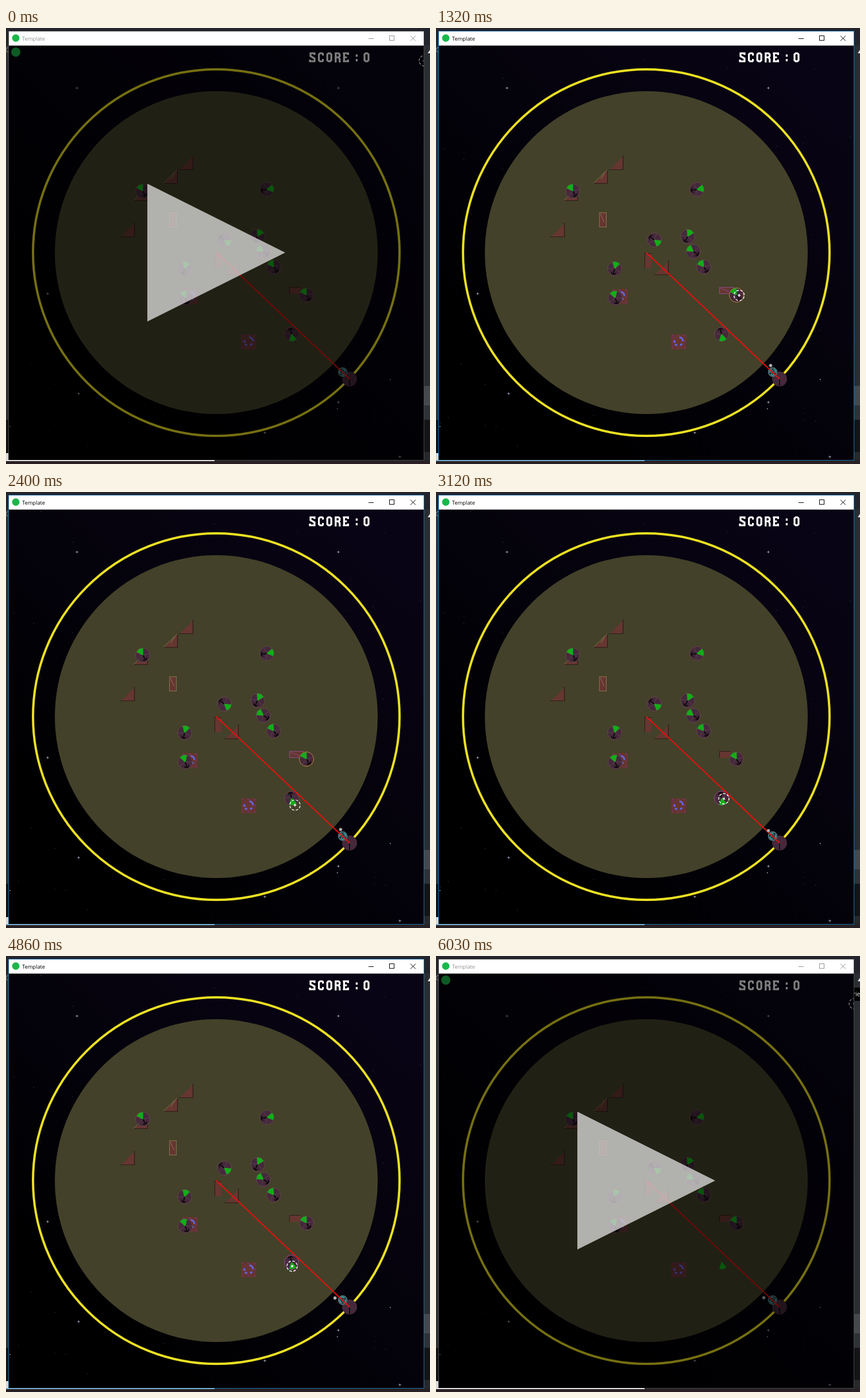
An HTML page with a canvas for the animation above (6.06 s loop, 738 px wide and 759 px high).

```html
<!DOCTYPE html>
<html lang="en">
<head>
<meta charset="utf-8">
<title>Template</title>
<style>
html, body { margin: 0; width: 738px; height: 759px; overflow: hidden; background: #24252c; }
canvas { display: block; }
</style>
</head>
<body>
<canvas id="stage" width="738" height="759" aria-label="Template, SCORE : 0"></canvas>
<script>
const ctx = document.getElementById('stage').getContext('2d');
const LOOP = 6060, RESUME = 120, PAUSE = 5850, SWITCH = 2640, BREAK = 5190, TIP = 5700;
const TAU = Math.PI * 2, RAD = Math.PI / 180;
const CX = 366, CY = 391;

// x, y, direction of the green wedge in degrees
const wheels = [
  [238, 284, -120], [454, 281, -10], [380, 369, 38], [438, 363, -63], [448, 389, -145],
  [466, 416, -125], [311, 419, -75], [312, 470, -108], [523, 465, -122], [497, 533, 77]
];
// right-angle corner of each ramp
const ramps = [[326, 247], [299, 271], [247, 301], [224, 364], [405, 430]];
const brightStars = [[123, 104], [578, 104], [72, 462], [126, 636], [578, 651], [450, 704], [685, 746]];

// time, x, y
const aimPath = [
  [120, 728, 57], [600, 526, 466], [1950, 529, 465], [2400, 503, 545], [3120, 501, 534],
  [4170, 498, 540], [5200, 498, 540], [5460, 711, 170], [5650, 728, 83]
];

const letters = {
  S: 'M10 5V2H3V7L10 11V16H2V13',
  C: 'M10 6V3L9 2H5L3 4V14L5 16H9L10 15V12',
  O: 'M5 2H8L10 4V14L8 16H5L3 14V4Z',
  R: 'M3 18V2H8L10 4V7L8 9H4M8 9L10 12V18',
  E: 'M10 5V2H1M3 2V16M1 16H10V13M3 9H8',
  ':': 'M4 4V8M4 12V16'
};

const smooth = k => {
  k = Math.min(1, Math.max(0, k));
  return k * k * (3 - 2 * k);
};

function along(path, t) {
  let i = 0;
  while (i < path.length - 2 && t > path[i + 1][0]) i++;
  const a = path[i], b = path[i + 1];
  const e = smooth((t - a[0]) / (b[0] - a[0]));
  return [a[1] + (b[1] - a[1]) * e, a[2] + (b[2] - a[2]) * e];
}

function rect(x, y, w, h, color) {
  ctx.fillStyle = color;
  ctx.fillRect(x, y, w, h);
}

function disc(x, y, r, color) {
  ctx.fillStyle = color;
  ctx.beginPath();
  ctx.arc(x, y, r, 0, TAU);
  ctx.fill();
}

function arc(x, y, r, from, to, color, width) {
  ctx.strokeStyle = color;
  ctx.lineWidth = width;
  ctx.beginPath();
  ctx.arc(x, y, r, from, to);
  ctx.stroke();
}

function line(color, width, ...p) {
  ctx.strokeStyle = color;
  ctx.lineWidth = width;
  ctx.beginPath();
  for (let i = 0; i < p.length; i += 2) ctx.lineTo(p[i], p[i + 1]);
  ctx.stroke();
}

function poly(color, ...p) {
  ctx.fillStyle = color;
  ctx.beginPath();
  for (let i = 0; i < p.length; i += 2) ctx.lineTo(p[i], p[i + 1]);
  ctx.fill();
}

function text(s, x, y, size, color) {
  ctx.fillStyle = color;
  ctx.font = size + 'px "Open Sans", sans-serif';
  ctx.fillText(s, x, y);
}

function at(x, y, angle, draw) {
  ctx.save();
  ctx.translate(x, y);
  ctx.rotate(angle);
  draw();
  ctx.restore();
}

function desktop(tip) {
  rect(0, 0, 738, 759, '#24252c');
  rect(0, 30, 5, 652, '#2e3236');
  rect(0, 682, 5, 58, '#121316');
  rect(0, 740, 5, 13, '#d8d8d8');
  arc(4, 38, 4, 0, TAU, '#85888b', 1);
  rect(727, 30, 11, 593, '#2a2e32');
  rect(727, 623, 11, 34, '#45494d');
  rect(727, 657, 11, 25, '#2e3236');
  rect(727, 682, 11, 56, '#141416');
  rect(727, 738, 11, 14, '#26282b');
  poly('#e4e4e4', 734, 44, 738, 38, 738, 44);
  rect(0, 754, 738, 5, '#292024');
  if (tip) {
    rect(726, 55, 12, 23, '#000');
    text('rie', 726, 70, 10, '#eee');
  }
}

function frame(active) {
  const ink = active ? '#000' : '#929292';
  ctx.lineWidth = 1;
  ctx.strokeStyle = active ? '#1c6ea4' : '#46484a';
  ctx.strokeRect(4.5, 5.5, 723, 747);
  rect(5, 6, 722, 24.6, '#fff');
  disc(17, 17.5, 6.5, '#19b84a');
  text('Template', 28, 21.5, 9.3, ink);
  line(ink, 1, 631, 18.5, 640, 18.5);
  ctx.strokeRect(667.5, 13.5, 8, 8);
  line(ink, 1, 704, 13.5, 713, 22.5);
  line(ink, 1, 713, 13.5, 704, 22.5);
  rect(0, 752, 363, 2, active ? '#75b3d6' : '#e6e6e6');
}

function space() {
  const g = ctx.createLinearGradient(150, 640, 640, 100);
  g.addColorStop(0, '#000');
  g.addColorStop(0.5, '#04020b');
  g.addColorStop(1, '#090415');
  rect(5, 30, 722, 722, g);
  let seed = 7;
  const rnd = () => (seed = seed * 16807 % 2147483647) / 2147483647;
  for (let i = 0; i < 70; i++) {
    const size = i % 5 ? 1 : 1.6;
    rect(6 + Math.floor(rnd() * 718), 32 + Math.floor(rnd() * 718), size, size, i % 5 ? '#464352' : '#aeacb9');
  }
  for (const [x, y] of brightStars) {
    rect(x - 2, y, 5, 1, '#777593');
    rect(x, y - 2, 1, 5, '#777593');
    rect(x, y, 1, 1, '#fff');
  }
  disc(CX, CY, 281, '#434129');
  arc(CX, CY, 319, 0, TAU, '#ece022', 4);
}

function ramp(x, y, outlined) {
  poly('#663631', x - 24, y, x, y, x, y - 24);
  line('#2b1c1a', 1.2, x - 25, y - 0.5, x - 0.5, y - 0.5, x - 0.5, y - 25);
  if (outlined) {
    line('#85734f', 1, x - 25, y - 0.5, x - 0.5, y - 24.5);
    line('#85734f', 1, x - 12, y - 8, x - 5, y - 20);
  }
}

function block(x, y, w, h, edge) {
  rect(x, y, w, h, '#663631');
  line('#2b1c1a', 1, x + 0.5, y + h, x + 0.5, y + 0.5, x + w, y + 0.5);
  if (!edge) return;
  ctx.strokeStyle = edge;
  ctx.strokeRect(x + 0.5, y + 0.5, w - 1, h - 1);
  line(edge, 1, x + 2, y + 2, x + w * 0.65, y + h * 0.65);
}

function vortexTile(x, y) {
  rect(x - 12.5, y - 12.5, 26, 26, '#663434');
  for (const dx of [-11, 0, 11]) for (const dy of [-11, 0, 11]) {
    if (dx || dy) rect(x + dx - 1, y + dy - 1, 2, 2, '#783a6d');
  }
  arc(x, y, 8, -80 * RAD, -5 * RAD, '#5f69e8', 3);
  for (const a of [45, 125, 180]) arc(x, y, 7, (a - 15) * RAD, (a + 20) * RAD, '#5f69e8', 3);
}

function wedge(angle) {
  ctx.save();
  ctx.rotate(angle);
  poly('#13ad18', -1, 0, 10.5, -6.5, 12.5, 0, 10.5, 6.5);
  ctx.restore();
}

function wheel([x, y, deg], edge) {
  at(x, y, 0, () => {
    disc(0, 0, 13, '#45293b');
    arc(0, 0, 12.5, 0, TAU, edge || '#625044', 1);
    for (let i = 0; i < 5; i++) {
      const a = deg * RAD + Math.PI / 5 + i * TAU / 5;
      line('#5c4653', 0.8, 0, 0, 12 * Math.cos(a), 12 * Math.sin(a));
    }
    wedge(deg * RAD);
    ctx.rotate((deg + 180) * RAD);
    line('#09060a', 1.8, 0, 0, 10, 0);
    line('#09060a', 1.5, 7, -4, 10, -2, 10, 2, 7, 4);
  });
}

function portal(t) {
  disc(586, 599, 8, '#22383a');
  arc(586, 599, 7.5, 0, TAU, '#55888b', 1.3);
  at(586, 599, t / 260, () => {
    for (let i = 0; i < 3; i++) {
      arc(0, 0, 5, i * TAU / 3, i * TAU / 3 + 1.4, '#43b5c2', 1.5);
      arc(0, 0, 2.5, i * TAU / 3 + 1, i * TAU / 3 + 2, '#7b9ca0', 1);
    }
  });
}

// drifts a sixth of a turn around the portal
function moon(t) {
  if (t < 700) return;
  const a = (-107 - 58 * smooth((t - 2300) / 2000)) * RAD;
  const d = 12 + 4 * smooth((t - 4000) / 1800);
  const x = 586 + d * Math.cos(a), y = 599 + d * Math.sin(a);
  disc(x, y, 2.8, '#b9bcbb');
  arc(x, y, 2.4, 0, TAU, '#747979', 0.8);
}

function score() {
  ctx.strokeStyle = '#fff';
  ctx.lineWidth = 3.2;
  let x = 527;
  for (const c of 'SCORE:O') {
    at(x, 42, 0, () => ctx.stroke(new Path2D(letters[c])));
    x += c === 'E' ? 21 : 14.6;
  }
}

function reticle(t) {
  const [x, y] = along(aimPath, t);
  at(x, y, (t - 2400) / 353, () => {
    for (let i = 0; i < 8; i++) {
      const a = i * TAU / 8;
      arc(0, 0, 9, a + 0.14, a + 0.64, '#fff', 1.4);
    }
    line('#fff', 1.4, -2.5, 0, 2.5, 0);
    line('#fff', 1.4, 0, -2.5, 0, 2.5);
  });
}

function world(t) {
  space();
  const firstHot = t > 690 && t < SWITCH;
  const secondHot = t >= SWITCH && t < BREAK;
  ramps.forEach(([x, y], i) => ramp(x, y, i === 1 || i === 2));
  block(284, 321, 13, 26, '#85734f');
  block(363, 392, 12, 26);
  block(493, 451, firstHot ? 26 : 20, 12, firstHot ? '#8b4b82' : '');
  vortexTile(422, 546);
  vortexTile(320, 467);
  wheels.forEach((w, i) => {
    if (i === 9 && t >= BREAK) return at(w[0], w[1], 0, () => wedge(w[2] * RAD));
    const edge = i === 8 && firstHot ? '#bd923b' : i === 9 && secondHot ? '#95518b' : '';
    wheel(w, edge);
  });
  disc(598, 611, 13, '#45293b');
  line('#130d12', 2, 598, 612, 598, 623);
  portal(t);
  line('#e8100e', 2, CX, CY, 598, 611);
  moon(t);
  score();
  reticle(t);
}

function draw(t) {
  const active = t >= RESUME && t < PAUSE;
  desktop(t >= TIP);
  ctx.save();
  ctx.beginPath();
  ctx.rect(5, 30, 722, 722);
  ctx.clip();
  world(Math.min(PAUSE, Math.max(RESUME, t)));
  if (!active) {
    disc(17, 42, 8, '#19b84a');
    rect(5, 30, 722, 722, 'rgba(0,0,0,0.5)');
    poly('rgba(255,255,255,0.65)', 246, 271, 486, 391, 246, 511);
  }
  ctx.restore();
  frame(active);
}

const start = performance.now();
function tick() {
  const t = (performance.now() - start) % LOOP;
  draw(Math.floor(t / 30) * 30);
  requestAnimationFrame(tick);
}
tick();
</script>
</body>
</html>
```
